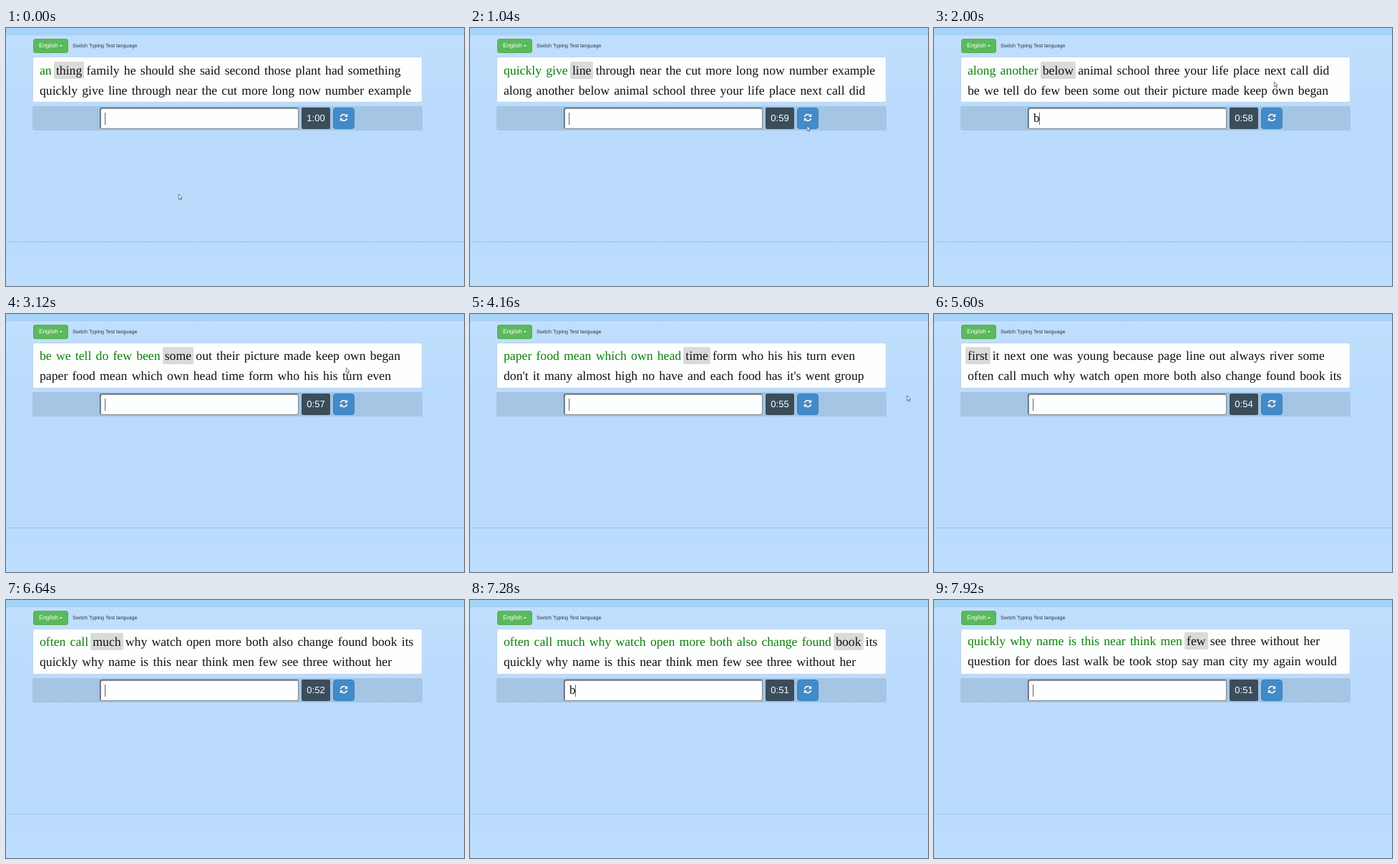
An HTML page for the animation above (8 s loop, 640 by 360 pixels).

```html
<!DOCTYPE html>
<html lang="en">
<head>
<meta charset="utf-8">
<title>Typing test</title>
<style>
  html, body { margin: 0; width: 100%; height: 100%; overflow: hidden; }
  body {
    position: relative;
    background: linear-gradient(#c0dffe 10px, #b9dafc 130px, #badbfc 298px, #bddefd 360px);
    font-family: "Liberation Sans", Arial, sans-serif;
    text-rendering: geometricPrecision;
  }
  body * { position: absolute; box-sizing: border-box; white-space: pre; }
  .band { left: 0; top: 0; width: 640px; height: 10px; background: #a6d4f9; border-bottom: 1px solid #a4cdf0; }
  .rule { left: 0; top: 298px; width: 640px; height: 1px; background: #9bc3e6; }
  .lang {
    left: 38px; top: 15px; width: 49px; height: 20px; border-radius: 3px;
    background: #5cb85c; border: 1px solid #52b152;
    color: #fff; font-size: 8.2px; line-height: 18px; padding-left: 7px;
  }
  .lang i { left: 36px; top: 8px; border: 2px solid transparent; border-top-color: #fff; border-bottom: 0; }
  .switch { left: 93px; top: 15px; font-size: 7.17px; line-height: 20px; color: #2d3640; }
  .words {
    left: 37px; top: 40px; width: 545px; height: 64px; overflow: hidden;
    background: #fdfefe; border: 1px solid #c3d6ea; border-radius: 3px;
  }
  .line, .typed { font-family: "Liberation Serif", "Times New Roman", serif; color: #111; }
  .line { left: 9px; font-size: 17.7px; line-height: 28px; word-spacing: 1.78px; }
  .line span { position: static; }
  .line .done { color: #0a800a; }
  .line .now { background: #dadada; border-radius: 2px; padding: 2px 3px; margin: 0 -3px; }
  .row { left: 37px; top: 109px; width: 545px; height: 34px; border-radius: 3px; background: #a4c5e3; }
  .field {
    left: 131px; top: 111px; width: 278px; height: 30px; background: #fdfefe;
    border: 1px solid #7b8690; border-top-color: #4d565e; border-left-color: #4d565e; border-radius: 3px;
    box-shadow: inset 1px 1px 1px #9aa3ab;
  }
  .typed { left: 139px; top: 112px; font-size: 17px; line-height: 28px; }
  .typed::after { content: ""; position: absolute; left: 100%; margin-left: -1px; top: 6px; width: 1px; height: 17px; background: #666; }
  .timer {
    left: 413px; top: 111px; width: 40px; height: 30px; border-radius: 2px; background: #3b4c5b;
    color: #fff; font-size: 13px; line-height: 30px; text-align: center;
  }
  .reload { left: 457px; top: 111px; width: 30px; height: 30px; border-radius: 4px; background: #428bca; border: 1px solid #3a82c2; }
  .reload svg { left: 8px; top: 7px; }
  .mouse { left: 0; top: 0; }
</style>
</head>
<body>
  <div class="band"></div>
  <div class="rule"></div>
  <div class="lang">English<i></i></div>
  <div class="switch">Switch Typing Test language</div>
  <div class="words"><div class="line"></div><div class="line"></div></div>
  <div class="row"></div>
  <div class="field"></div>
  <div class="typed"></div>
  <div class="timer"></div>
  <div class="reload">
    <svg width="12" height="12" viewBox="0 0 12 12">
      <path d="M1.6 5.2A4.4 4.4 0 0 1 9.4 3.2M10.4 6.8A4.4 4.4 0 0 1 2.6 8.8" fill="none" stroke="#fff" stroke-width="1.6"/>
      <path d="M11.2 .8V5H7ZM.8 11.2V7H5Z" fill="#fff"/>
    </svg>
  </div>
  <svg class="mouse" width="8" height="11" viewBox="0 0 8 11">
    <path d="M.8 .8V8L2.4 6.6 3.5 9.2 4.7 8.7 3.6 6.1H5.6Z" fill="#fff" stroke="#3a4148" stroke-width=".7"/>
  </svg>
<script>
const LOOP = 8000, STEP = 80, LINE = 28;

const lines = [
  "an thing family he should she said second those plant had something",
  "quickly give line through near the cut more long now number example",
  "along another below animal school three your life place next call did",
  "be we tell do few been some out their picture made keep own began",
  "paper food mean which own head time form who his his turn even",
  "don't it many almost high no have and each food has it's went group",
  "first it next one was young because page line out always river some",
  "often call much why watch open more both also change found book its",
  "quickly why name is this near think men few see three without her",
  "question for does last walk be took stop say man city my again would"
].map(s => s.split(" "));

// [time, words finished]; the fraction is progress within the current word
const pace = [[0, 1.3], [2000, 26.78], [3120, 42.3], [4160, 56.3], [5600, 77.3], [6640, 92.3], [7920, 111.3], [8000, 112.3]];
// [time, x, y]
const path = [[0, 240.5, 231], [880, 468, 166], [1360, 474.5, 74], [3200, 474.5, 74], [3520, 612, 113], [4160, 610, 113], [4480, 642, 113], [8000, 642, 113]];

const $ = s => document.querySelector(s);
const rows = document.querySelectorAll(".line");
const typed = $(".typed"), timer = $(".timer"), mouse = $(".mouse");

function at(keys, t) {
  let i = 1;
  while (i < keys.length - 1 && keys[i][0] <= t) i++;
  const a = keys[i - 1], b = keys[i];
  const p = (t - a[0]) / (b[0] - a[0]);
  return a.slice(1).map((v, n) => v + (b[n + 1] - v) * p);
}

function setLine(el, words, current) {
  el.innerHTML = words.map((w, i) => {
    const state = i < current ? "done" : i === current ? "now" : "";
    return `<span class="${state}">${w}</span>`;
  }).join(" ");
}

function draw(t) {
  const [pos] = at(pace, t);
  let word = Math.floor(pos), row = 0;
  const part = pos - word;
  while (word >= lines[row].length) word -= lines[row++].length;

  setLine(rows[0], lines[row], word);
  setLine(rows[1], lines[row + 1], -1);
  const top = 4 - row * 0.2;
  rows[0].style.top = top + "px";
  rows[1].style.top = top + LINE + "px";

  // letters land in a quick burst at the end of each word
  const text = lines[row][word];
  const count = part < 0.75 ? 0 : Math.floor((part - 0.75) * 4 * text.length) + 1;
  typed.textContent = text.slice(0, count);

  const left = 60 - Math.max(0, Math.floor((t - 140) / 790));
  timer.textContent = left === 60 ? "1:00" : "0:" + left;

  const [x, y] = at(path, t);
  mouse.style.transform = `translate(${x}px, ${y}px)`;
}

let last = -1;
function tick() {
  const t = Math.floor(performance.now() % LOOP / STEP) * STEP;
  if (t !== last) draw(last = t);
  requestAnimationFrame(tick);
}
tick();
</script>
</body>
</html>
```
